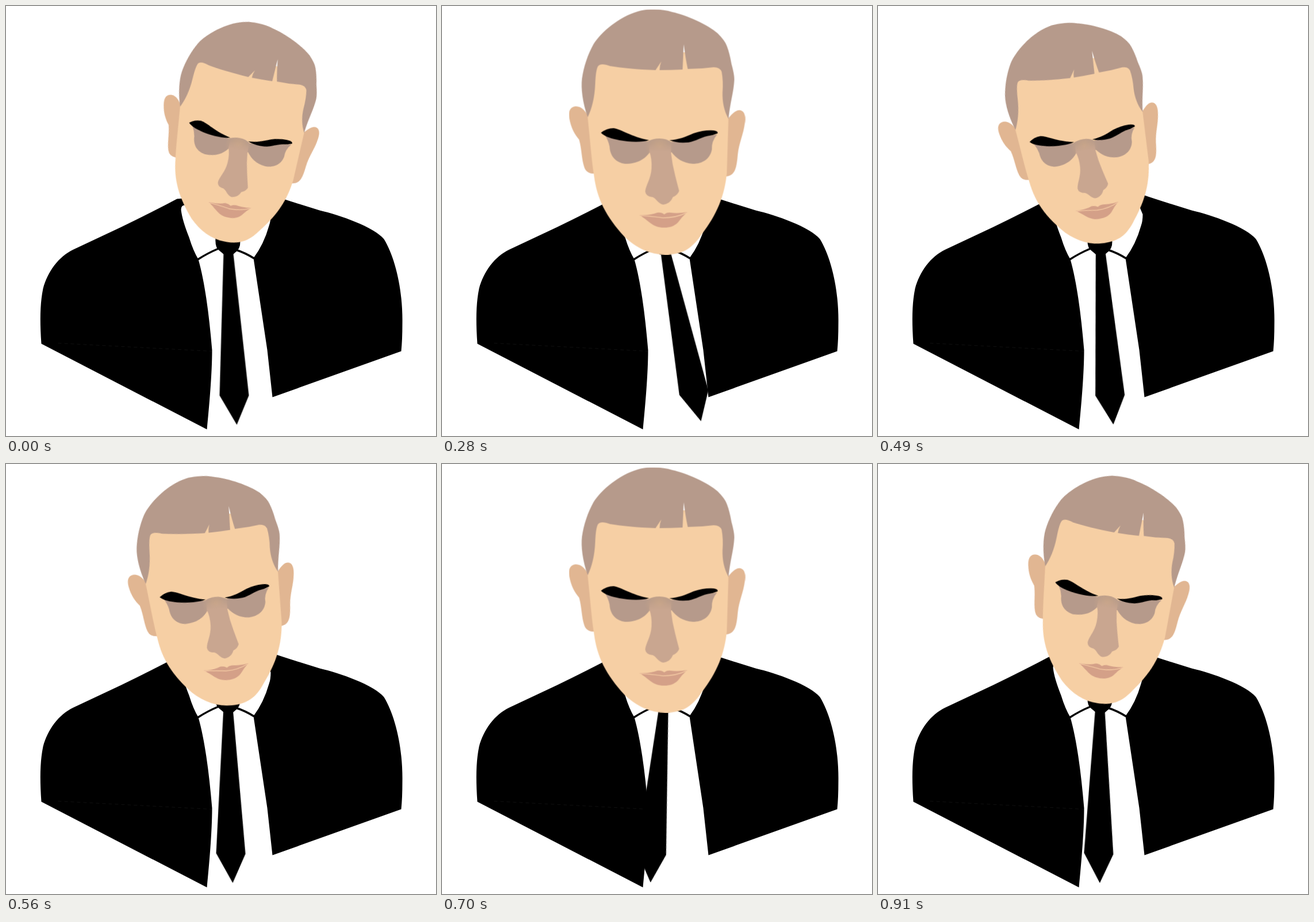
Animation of 748 by 748 pixels, one loop 0.98 s. Source, as an HTML page without scripts:

```html
<!DOCTYPE html>
<html lang="en">
<head>
<meta charset="utf-8">
<title>Nodding man in a suit</title>
<style>
  html, body { margin: 0; width: 100%; height: 100%; overflow: hidden; background: #fff; }
  svg { display: block; width: 100vw; height: 100vh; }

  .tie { transform-origin: 386px 415px; animation: swing 980ms steps(2) infinite; }
  .head { transform-origin: 388.8px 246.2px; animation: sway 980ms step-end infinite; }

  @keyframes swing {
    0% { transform: rotate(0deg); }
    14.28% { transform: rotate(-4.2deg); }
    28.57% { transform: rotate(-9.05deg); }
    42.85% { transform: rotate(-4.2deg); }
    57.14% { transform: rotate(1.3deg); }
    71.42% { transform: rotate(7.1deg); animation-timing-function: step-end; }
    78.57% { transform: rotate(8.6deg); animation-timing-function: steps(3); }
    100% { transform: rotate(0deg); }
  }

  /* The head tilts across and back through the same eight poses. */
  @keyframes sway {
    0%, 100% { transform: translate(24.2px, -.8px) rotate(11.25deg) scale(.9); }
    7.14%, 92.85% { transform: translate(18.8px, -1px) rotate(8.68deg) scale(.928); }
    14.28%, 85.71% { transform: translate(11.8px, -1px) rotate(5.82deg) scale(.961); }
    21.42%, 78.57% { transform: translate(5.8px, -.4px) rotate(2.9deg) scale(.99); }
    28.57%, 71.42% { transform: translate(0, 0) rotate(0deg) scale(1); }
    35.71%, 64.28% { transform: translate(-6.6px, -.6px) rotate(-2.9deg) scale(.972); }
    42.85%, 57.14% { transform: translate(-13.6px, -1.4px) rotate(-5.91deg) scale(.943); }
    50% { transform: translate(-20.3px, -2px) rotate(-8.7deg) scale(.912); }
  }
</style>
</head>
<body>
<svg viewBox="-.5 -.5 748 748">
  <defs>
    <radialGradient id="bridge" gradientUnits="userSpaceOnUse" cx="378" cy="244" r="26">
      <stop offset="0" stop-color="#c8a588"/>
      <stop offset="1" stop-color="#b69a8b"/>
    </radialGradient>
    <linearGradient id="nose" gradientUnits="userSpaceOnUse" x1="0" y1="238" x2="0" y2="253">
      <stop offset="0" stop-color="#c9a690" stop-opacity="0"/>
      <stop offset="1" stop-color="#c9a690"/>
    </linearGradient>
  </defs>

  <!-- Jacket -->
  <path d="M61 587C58 545 59 515 64 491C72 462 90 436 117 423L200 384Q250 360 297 335L312 334V346Q304 345 304 354Q306 372 318 402Q325 425 334 440C346 482 353 540 358 598C358 640 353 695 349 736Z"/>
  <path d="M455 326Q480 335 545 355C580 363 640 384 657 405C676 436 690 492 689 552Q689 580 687 600L463 680L454 598L430 438Q448 414 457 382Q460 374 460 362L455 350Z"/>
  <path d="M90 586L357 600" stroke="#101010" stroke-dasharray="6 5"/>

  <!-- Collar, knot and tie -->
  <path d="M333 440.500Q351 429 368 422M431 438.500Q416 429 399 423.500" fill="none" stroke="#000" stroke-width="3.5"/>
  <path d="M364 402H406Q409 417 402 425L394 432H379L367 422Q363 414 364 402Z"/>
  <path class="tie" d="M378 426H394.500L422 677L401 728L371 677Z"/>

  <g class="head">
    <g fill="#e1b692">
      <path d="M258 200C250 182 243 174 232 174C222 175 219 183 221 195C224 212 230 222 238 232C243 250 242 265 247 280Q251 292 266 291Z"/>
      <path d="M495 198C503 188 511 179 519 181C527 183 528 194 526 205C524 222 516 238 514 258C512 280 510 295 493 296Z"/>
    </g>
    <path fill="#f6cfa4" d="M252 185C257 230 259 262 264 295C269 335 285 366 317 401C338 421 362 432 388 432C415 432 433 424 451 397C478 362 491 330 495 290L498 190L488 80H266Z"/>
    <path fill="#b69a8b" d="M253 193C244 168 241 142 243 126C246 105 253 84 263 66C276 45 308 18 340 9Q352 5 365 5.500Q385 5 400 10C424 15 462 32 479 47Q492 60 495 69Q500 82 503 100Q508 118 508 127C507 150 501 165 498 196C490 182 487 165 487.500 150Q489 130 486 114Q483 106 472 106Q450 109 427 109Q423 90 420 66L418 110Q398 111 378 111Q378 103 381 96L371 111C340 110 310 107 292 104Q276 98 271 104Q267 110 266 135C265 160 260 178 253 193Z"/>

    <!-- Eye sockets and nose -->
    <path fill="url(#bridge)" d="M283 224L358 235Q366 230 378 230Q390 230 398 236L478 223Q468 235 469 249C466 266 452 274 436 274C418 273 407 264 399 254H361C352 266 340 274 318 274C303 272 292 262 291 244Q289 234 283 224Z"/>
    <path fill="url(#nose)" d="M361 238H398V256Q400 275 405 294Q409 310 412 321Q410 328 401 332C398 340 392 344 384 345C375 343 373 335 366 332Q354 331 353 322C354 311 363 300 364 282Q365 265 360 252Z"/>

    <!-- Brows -->
    <path d="M276 220Q286 212 298 212C312 214 328 227 360 233C346 237 325 236 308 233C294 230 283 227 276 220Z"/>
    <path d="M395 233C412 232 423 227 437 221Q455 215 472 216Q480 217 479 221Q470 225 460 226C448 229 436 237 424 237Q408 238 395 233Z"/>

    <!-- Mouth -->
    <path fill="#d4a088" d="M343 363Q362 364 374 359Q381 358 386 362Q391 358 397 359Q410 361 426 358Q417 366 410 376C403 383 395 385 386 385C366 385 362 375 343 363Z"/>
    <path fill="none" stroke="#f3c8a2" stroke-width="1.500" d="M344 364Q362 365 384 368Q407 368 425 359"/>
  </g>
</svg>
</body>
</html>
```
